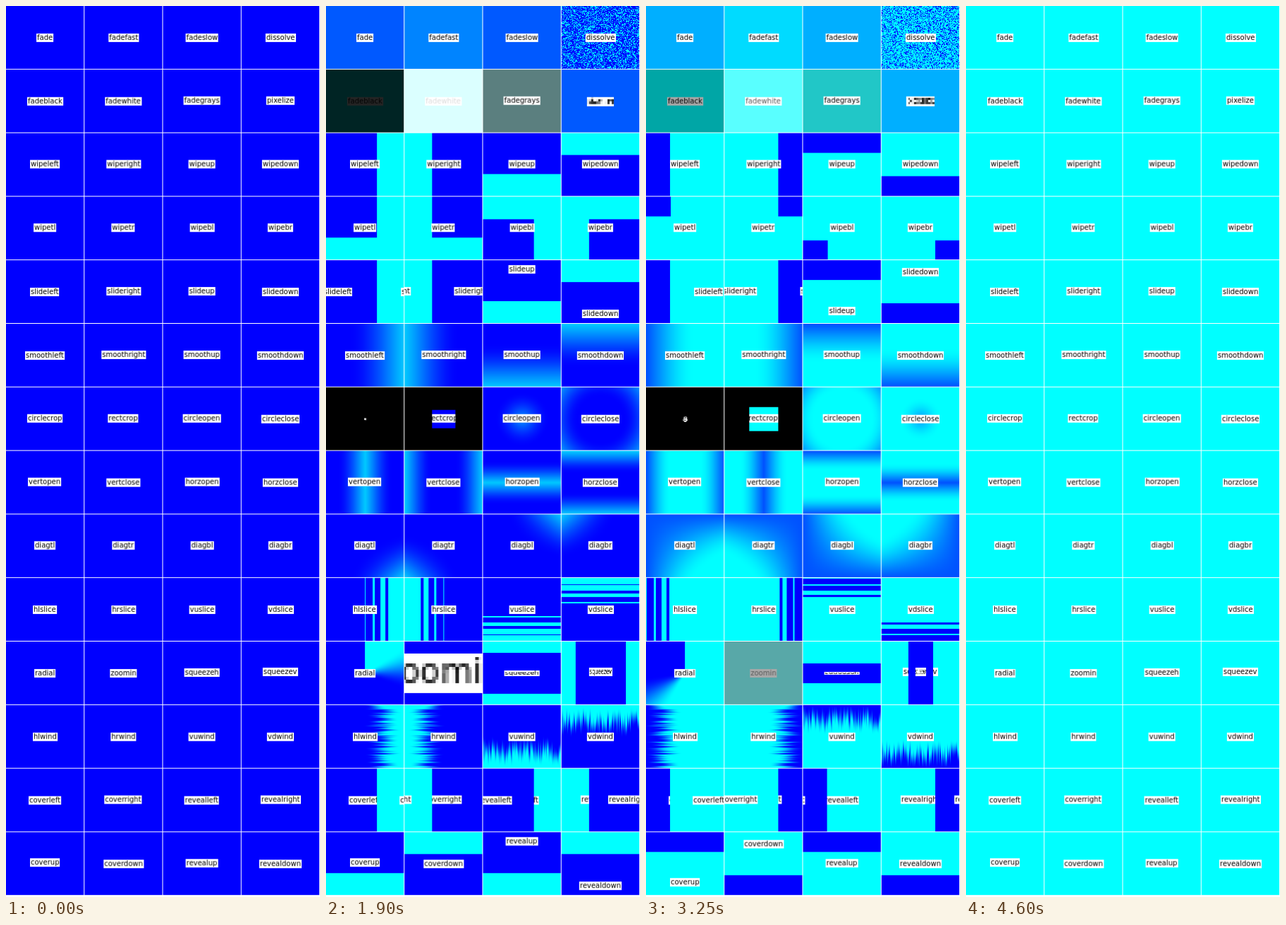
An HTML page with a canvas that plays this animation: 445 px wide and 1259 px high, repeating every 5000 ms.

```html
<!DOCTYPE html>
<html lang="en">
<head>
<meta charset="utf-8">
<title>Transition gallery</title>
<style>
  html, body { margin: 0; width: 100%; height: 100%; overflow: hidden; background: #fff; }
  canvas { display: block; }
</style>
</head>
<body>
<canvas id="stage" width="445" height="1259"></canvas>
<script>
// Cells lie on a whole-pixel sheet, which is then fitted to the stage.
const COLS = 4, ROWS = 14, CELL_W = 110, CELL_H = 89, GAP = 1;
const SHEET_W = COLS * (CELL_W + GAP), SHEET_H = ROWS * (CELL_H + GAP);
const FIT_W = 445, FIT_H = 1257.2;
const LOOP = 5000, STEP = 50, START = 500, LENGTH = 4000, END = 4600;
const BLUE = [0, 0, 255], CYAN = [0, 255, 255], BLACK = [0, 0, 0], WHITE = [255, 255, 255];
const GRAYS = Array.from({ length: 256 }, (_, i) => [i, i, i]);

const { abs, min, floor, ceil, round, hypot, fround, PI } = Math;
const clamp = t => t < 0 ? 0 : t > 1 ? 1 : t;
const smooth = (a, b, x) => { const t = clamp((x - a) / (b - a)); return t * t * (3 - 2 * t); };
const blend = (a, b, m) => a * m + b * (1 - m);
const mix = (a, b, m) => m >= 1 ? a : m <= 0 ? b :
  [blend(a[0], b[0], m), blend(a[1], b[1], m), blend(a[2], b[2], m)];
const gray = c => GRAYS[round((c[0] + c[1] + c[2]) / 3)];

// single precision noise
function rand(x, y) {
  const a = fround(fround(x * fround(12.9898)) + fround(y * fround(78.233)));
  const r = fround(fround(Math.sin(a)) * fround(43758.545));
  return r - floor(r);
}

// Every transition is (x, y, p, A, B, w, h) => colour; p runs from 1 (A) to 0 (B).
const weigh = f => (x, y, p, A, B, w, h) =>
  mix(B(x, y), A(x, y), f(x / w, y / h, p, x, y, w, h));
const soft = f => weigh((u, v, p, x, y, w, h) => smooth(0, 1, f(u, v, p, x, y, w, h)));
const slice = f => weigh((u, v, p) => {
  const s = f(u, v), k = 10 * s;
  return smooth(-.5, 0, s - p * 1.5) > k - floor(k);
});
const wind = (along, seed) => weigh((u, v, p, x, y) =>
  smooth(0, -.2, along(u, v) * .8 + seed(x, y) * .2 - (1 - p) * 1.2));
const power = f => (x, y, p, A, B) => {
  const a = A(x, y), b = B(x, y);
  return a.map((c, i) => blend(c, b[i], p ** (1 + Math.log(f(abs(c - b[i]) / 255)))));
};
const through = tint => (x, y, p, A, B) => {
  const a = A(x, y), b = B(x, y);
  return mix(mix(a, tint(a), smooth(.8, 1, p)), mix(tint(b), b, smooth(.2, 1, p)), p);
};
const corner = (right, bottom) => weigh((u, v, p) =>
  !((right ? u > 1 - p : u <= p) && (bottom ? v > 1 - p : v <= p)));
const crop = inside => (x, y, p, A, B, w, h) =>
  inside(x - w / 2, y - h / 2, abs(p - .5), w, h) ? (p < .5 ? B : A)(x, y) : BLACK;
const radius = (x, y, w, h) => hypot(x - w / 2, y - h / 2) / hypot(w / 2, h / 2);

// A leaves towards (dx, dy); each picture either travels or stays put.
const shift = (dx, dy, moveA, moveB) => (x, y, p, A, B, w, h) => {
  const ax = x - round(dx * (1 - p) * w), ay = y - round(dy * (1 - p) * h);
  if (ax >= 0 && ax < w && ay >= 0 && ay < h) return moveA ? A(ax, ay) : A(x, y);
  return moveB ? B(ax + dx * w, ay + dy * h) : B(x, y);
};
const four = (name, moveA, moveB) => ({
  [name + 'left']: shift(-1, 0, moveA, moveB),
  [name + 'right']: shift(1, 0, moveA, moveB),
  [name + 'up']: shift(0, -1, moveA, moveB),
  [name + 'down']: shift(0, 1, moveA, moveB)
});
const rowNoise = (x, y) => rand(0, y), colNoise = x => rand(x, 0);

const transitions = {
  fade: weigh((u, v, p) => 1 - p),
  fadefast: power(d => 1 + d),
  fadeslow: power(d => 2 - d),
  dissolve: weigh((u, v, p, x, y) => rand(x, y) < 1 - p),

  fadeblack: through(() => BLACK),
  fadewhite: through(() => WHITE),
  fadegrays: through(gray),
  pixelize(x, y, p, A, B, w, h) {
    const d = ceil(min(p, 1 - p) * 50) / 50, size = d * min(w, h) / 10;
    const snap = (n, max) => d > 0 ? floor(min((floor(n / size) + .5) * size, max - 1)) : n;
    const sx = snap(x, w), sy = snap(y, h);
    return mix(A(sx, sy), B(sx, sy), p);
  },

  ...four('wipe', false, false),

  wipetl: corner(false, false),
  wipetr: corner(true, false),
  wipebl: corner(false, true),
  wipebr: corner(true, true),

  ...four('slide', true, true),

  smoothleft: soft((u, v, p) => 1 + u - 2 * p),
  smoothright: soft((u, v, p) => 2 - u - 2 * p),
  smoothup: soft((u, v, p) => 1 + v - 2 * p),
  smoothdown: soft((u, v, p) => 2 - v - 2 * p),

  circlecrop: crop((x, y, d, w, h) => hypot(x, y) < (2 * d) ** 3 * hypot(w / 2, h / 2)),
  rectcrop: crop((x, y, d, w, h) => abs(x) < d * w && abs(y) < d * h),
  circleopen: weigh((u, v, p, ...at) => 1 - smooth(0, 1, radius(...at) + (p - .5) * 3)),
  circleclose: soft((u, v, p, ...at) => radius(...at) + (.5 - p) * 3),

  vertopen: soft((u, v, p) => 2 - abs(2 * u - 1) - 2 * p),
  vertclose: soft((u, v, p) => 1 + abs(2 * u - 1) - 2 * p),
  horzopen: soft((u, v, p) => 2 - abs(2 * v - 1) - 2 * p),
  horzclose: soft((u, v, p) => 1 + abs(2 * v - 1) - 2 * p),

  diagtl: soft((u, v, p) => 1 + u * v - 2 * p),
  diagtr: soft((u, v, p) => 1 + (1 - u) * v - 2 * p),
  diagbl: soft((u, v, p) => 1 + u * (1 - v) - 2 * p),
  diagbr: soft((u, v, p) => 1 + (1 - u) * (1 - v) - 2 * p),

  hlslice: slice(u => u),
  hrslice: slice(u => 1 - u),
  vuslice: slice((u, v) => v),
  vdslice: slice((u, v) => 1 - v),

  radial: soft((u, v, p, x, y, w, h) => Math.atan2(x - w / 2, y - h / 2) - (p - .5) * PI * 2.5),
  zoomin(x, y, p, A, B, w, h) {
    const zoom = smooth(.5, 1, p);
    const at = (n, size) => ceil((zoom * (n / size - .5) + .5) * (size - 1));
    return mix(A(at(x, w), at(y, h)), B(x, y), smooth(0, .5, p));
  },
  squeezeh(x, y, p, A, B, w, h) {
    const z = .5 + (y / h - .5) / p;
    return z >= 0 && z <= 1 ? A(x, round(z * (h - 1))) : B(x, y);
  },
  squeezev(x, y, p, A, B, w) {
    const z = .5 + (x / w - .5) / p;
    return z >= 0 && z <= 1 ? A(round(z * (w - 1)), y) : B(x, y);
  },

  hlwind: wind(u => 1 - u, rowNoise),
  hrwind: wind(u => u, rowNoise),
  vuwind: wind((u, v) => 1 - v, colNoise),
  vdwind: wind((u, v) => v, colNoise),

  ...four('cover', false, true),
  ...four('reveal', true, false)
};
// The last two rows run cover left/right, reveal left/right, then the vertical ones.
const names = Object.keys(transitions);
const tail = names.splice(-8);
names.push(...[0, 1, 4, 5, 2, 3, 6, 7].map(i => tail[i]));

const surface = (width, height) =>
  Object.assign(document.createElement('canvas'), { width, height }).getContext('2d');

// Gray levels of a label in its cell, -1 outside the white box.
function label(name, w, h) {
  const c = surface(w, h);
  c.font = '10px "DejaVu Sans", sans-serif';
  const tw = c.measureText(name).width, x = round((w - tw) / 2);
  const up = /[bdfhiklt]/.test(name) ? 8 : 6, down = /[gpq]/.test(name) ? 2 : 0;
  const base = floor((h - up - down) / 2) + up;
  c.fillStyle = '#fff';
  c.fillRect(x - 1, base - 9, round(tw) + 2, 12);
  c.fillStyle = '#000';
  c.fillText(name, x, base);
  const { data } = c.getImageData(0, 0, w, h);
  return Int16Array.from({ length: w * h }, (_, i) => data[i * 4 + 3] ? data[i * 4] : -1);
}

const cells = names.map((name, i) => {
  const ink = label(name, CELL_W, CELL_H);
  // the zoom ends on a half-tone pixel in the middle of its label
  if (name === 'zoomin') ink[ceil((CELL_H - 1) / 2) * CELL_W + ceil((CELL_W - 1) / 2)] = 128;
  const picture = back => (x, y) => {
    const g = ink[y * CELL_W + x];
    return g < 0 ? back : GRAYS[g];
  };
  return {
    left: i % COLS * (CELL_W + GAP), top: floor(i / COLS) * (CELL_H + GAP),
    A: picture(BLUE), B: picture(CYAN), shade: transitions[name]
  };
});

const ctx = document.getElementById('stage').getContext('2d');
const sheet = surface(SHEET_W, SHEET_H);
const image = sheet.createImageData(SHEET_W, SHEET_H);
image.data.fill(255);
ctx.imageSmoothingQuality = 'high';

function draw(time) {
  const p = clamp(1 - (time - START) / LENGTH);
  for (const { left, top, A, B, shade } of cells) {
    const pick = time < START ? A : time >= END ? B : shade;
    for (let y = 0; y < CELL_H; y++) {
      let o = ((top + y) * SHEET_W + left) * 4;
      for (let x = 0; x < CELL_W; x++, o += 4) {
        const c = pick(x, y, p, A, B, CELL_W, CELL_H);
        image.data[o] = c[0];
        image.data[o + 1] = c[1];
        image.data[o + 2] = c[2];
      }
    }
  }
  sheet.putImageData(image, 0, 0);
  ctx.clearRect(0, 0, ctx.canvas.width, ctx.canvas.height);
  ctx.drawImage(sheet.canvas, 0, 0, FIT_W, FIT_H);
}

let shown = -1;
function tick(now) {
  const time = floor(now % LOOP / STEP) * STEP;
  if (time !== shown) draw(shown = time);
  requestAnimationFrame(tick);
}
draw(0);
requestAnimationFrame(tick);
</script>
</body>
</html>
```
